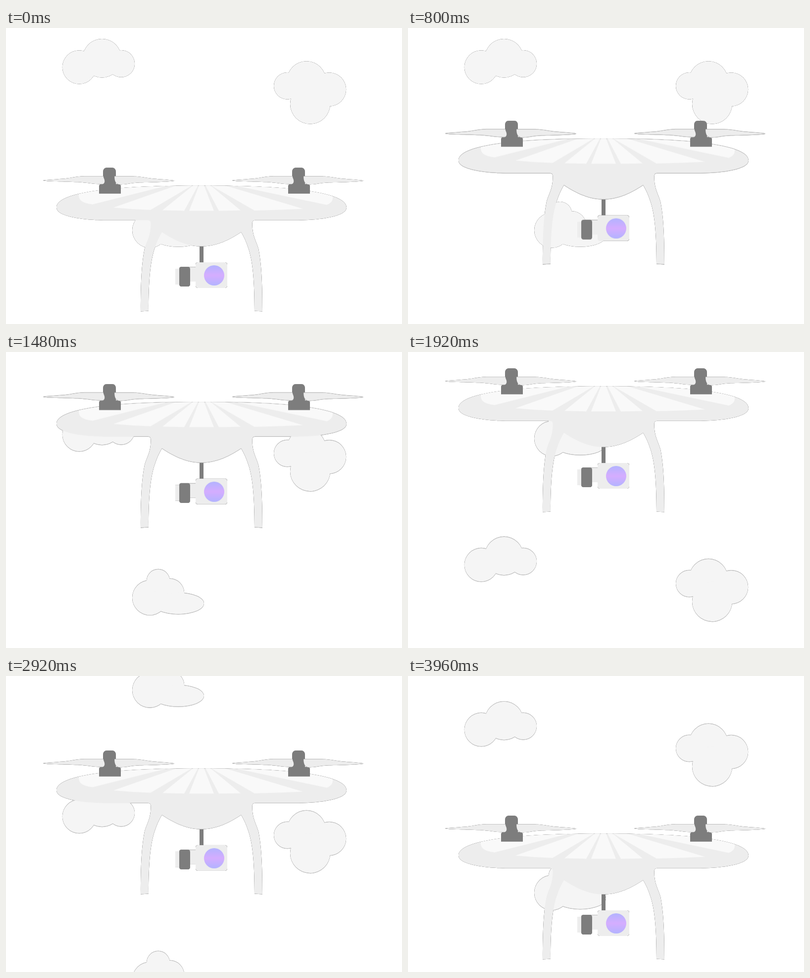
An HTML page that plays this animation: 800x600 px, repeating every 4 s.

```html
<!DOCTYPE html>
<html lang="en">
<head>
<meta charset="utf-8">
<title>Drone</title>
<style>
  html, body { margin: 0; width: 100%; height: 100%; overflow: hidden; background: #fff; }
  svg { display: block; width: 800px; height: 600px; }
</style>
</head>
<body>
<svg viewBox="0 0 800 600">
  <defs>
    <!-- Soft edge pixels are darkened by a black matte: the thin grey outline of the silhouette -->
    <filter id="matte" filterUnits="userSpaceOnUse" x="0" y="0" width="800" height="600" color-interpolation-filters="sRGB">
      <feFlood flood-color="#000" result="black"/>
      <feComposite in="SourceGraphic" in2="black" operator="over" result="dark"/>
      <feComposite in="dark" in2="SourceAlpha" operator="in"/>
    </filter>

    <linearGradient id="glass" x2="0" y2="1">
      <stop offset="0" stop-color="#b3b3ff"/>
      <stop offset=".5" stop-color="#d5adff"/>
      <stop offset="1" stop-color="#b3b3ff"/>
    </linearGradient>

    <path id="hull" d="M102 364C102 332 220 319.3 395 319.3S688 332 688 364
      C688 381 640 389.8 583 389.8H503Q497.5 389.8 497.5 396C497.5 421 505 430 510 447
      C516 477 518 515 518 574.5L502 573.6C502 510 498 470 489 445Q484 429 475 413.7
      C445 434 420 442.5 395 442.5S345 434 315 413.7Q306 429 301 445
      C292 470 288 510 288 573.6L272 574.5C272 515 274 477 280 447
      C285 430 292.5 421 292.5 396Q292.5 389.8 287 389.8H207C150 389.8 102 381 102 364Z"/>
    <clipPath id="hullClip"><use href="#hull"/></clipPath>

    <g id="rotor">
      <path fill="#7d7d7d" d="M196 292Q196 283 205 283H213Q222 283 222 292V316.5H227Q232 316.5 232 321.5V335.8H188V321.5Q188 316.5 193 316.5H196Z"/>
      <path d="M75 309C78 307.6 110 306.6 125 304.6C140 302.2 145 300.3 165 300.3H196.5
        C197 304 199.5 307 199.3 311Q199 316.5 193 316.5C175 316.5 165 313.5 145 312.3C120 311.4 80 311.4 75 309Z"/>
      <path d="M340 309.4C337 307.6 305 306.4 290 304.4C275 302.2 270 300.4 250 300.4H219.3
        C219 304 219.6 309 221.5 312.5Q224 317.2 231 317.2C245 317 250 314.3 270 313.2C295 312.4 337 312 340 309.4Z"/>
    </g>

    <g id="sky">
      <circle cx="148" cy="79.4" r="34.2"/>
      <circle cx="194" cy="61.3" r="39.2"/>
      <circle cx="232.7" cy="72.4" r="27.4"/>

      <circle cx="568.3" cy="117.4" r="27.3"/>
      <circle cx="607" cy="106.6" r="39.4"/>
      <circle cx="653" cy="124.5" r="34.2"/>
      <circle cx="614.5" cy="154" r="40.5"/>

      <circle cx="290.6" cy="410" r="35.6"/>
      <circle cx="307.5" cy="375.6" r="23.5"/>
      <circle cx="331" cy="400.4" r="29.2"/>
      <ellipse cx="348" cy="421.6" rx="52" ry="22"/>
    </g>
  </defs>

  <g filter="url(#matte)">
    <g id="clouds" fill="#f5f5f5">
      <use href="#sky"/>
      <use href="#sky" y="586.667"/>
    </g>

    <g id="drone" fill="#ededed">
      <rect x="391" y="440" width="8" height="36" fill="#7d7d7d"/>
      <use href="#hull"/>
      <g fill="#f9f9f9" clip-path="url(#hullClip)">
        <path d="M147 310V339C147 352 160 355.5 175 357.5L322 320.5V310Z"/>
        <path d="M217 364Q254 367.5 292 368.8L376 319H345Z"/>
        <path d="M316 369.6L360 370.4L388 319H378Z"/>
        <path d="M370 370.5H420L400 319H390Z"/>
        <path d="M430 370.4L474 369.8L413 319H403Z"/>
        <path d="M502 370Q555 369 600 366.6L442 319H414Z"/>
        <path d="M468 310V320.5L648 358.5C657 355 661 350 660 341V310Z"/>
      </g>
      <use href="#rotor"/>
      <use href="#rotor" x="382"/>

      <rect x="342" y="488" width="10" height="32"/>
      <rect x="370" y="484.4" width="15" height="29.6"/>
      <rect x="350" y="484" width="22" height="40" rx="4.5" fill="#7d7d7d"/>
      <rect x="383" y="475" width="64" height="52" rx="4.5"/>
      <circle cx="420.5" cy="501.5" r="20.5" fill="url(#glass)"/>
    </g>
  </g>
</svg>
<script>
  const LOOP = 4000, STEPS = 100;
  const CLOUD_STEPS = 20, CLOUD_TRAVEL = 586.667, LIFT = 250;

  const ease = p => {
    const x = Math.min(1, Math.max(0, p));
    return x * x * (3 - 2 * x);
  };

  // Beats of 1/21 loop: rise for 10, hold 1, sink for 9, hold 1
  const droneY = k => {
    const beat = k / STEPS * 21;
    return -LIFT * (ease(beat / 10) - ease((beat - 11) / 9));
  };
  const cloudY = k => -CLOUD_TRAVEL * (k % CLOUD_STEPS) / CLOUD_STEPS;

  function play(id, yAt) {
    const frames = Array.from({ length: STEPS + 1 }, (_, k) => ({
      offset: k / STEPS,
      transform: `translate(0px, ${yAt(k).toFixed(3)}px)`,
      easing: 'step-end'
    }));
    document.getElementById(id).animate(frames, { duration: LOOP, iterations: Infinity });
  }

  play('clouds', cloudY);
  play('drone', droneY);
</script>
</body>
</html>
```
